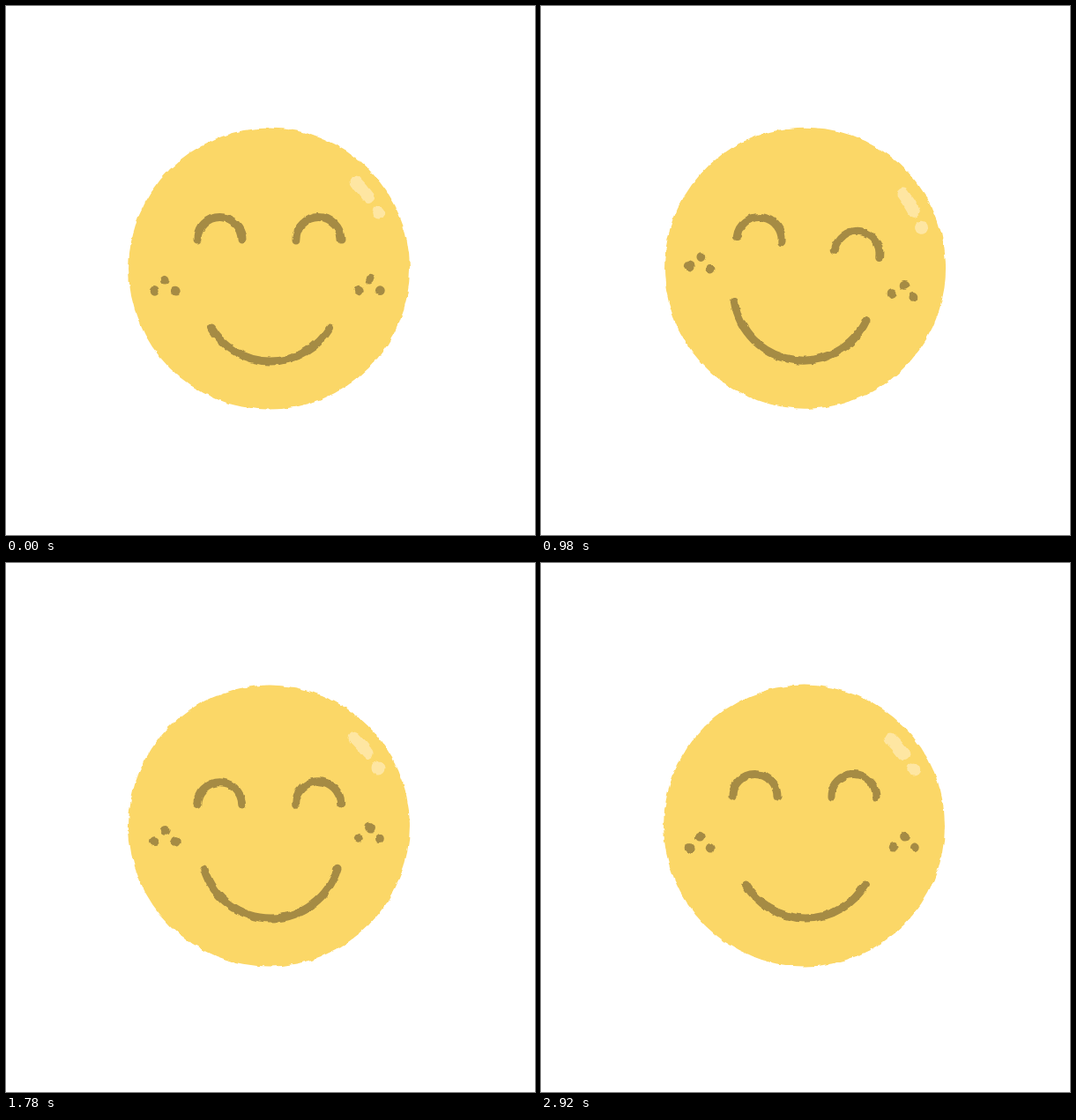
Animation of 600x600 px, one loop 2960 ms. Source, as an HTML page:

```html
<!DOCTYPE html>
<html lang="en">
<head>
<meta charset="utf-8">
<title>Smiley</title>
<style>
  html, body { margin: 0; width: 100%; height: 100%; overflow: hidden; background: #fff; }
  svg { display: block; width: 100%; height: 100%; }
  .line { fill: none; stroke: #a58b44; stroke-width: 9; stroke-linecap: round; }
  .dot { fill: #a58b44; }
</style>
</head>
<body>
<svg viewBox="0 0 600 600">
  <defs>
    <filter id="rough" filterUnits="userSpaceOnUse" x="125" y="125" width="350" height="350" color-interpolation-filters="sRGB">
      <feTurbulence id="noise" type="fractalNoise" baseFrequency="0.09" numOctaves="2" seed="1" result="n"/>
      <feDisplacementMap in="SourceGraphic" in2="n" scale="4.5" xChannelSelector="R" yChannelSelector="G"/>
      <feGaussianBlur stdDeviation="0.4"/>
    </filter>
  </defs>
  <g filter="url(#rough)">
    <g id="head">
      <circle cx="298.5" cy="298" r="159.5" fill="#fbd767"/>
      <path d="M396.5 199.5A139 139 0 0 1 411.5 217" fill="none" stroke="#fee6a2" stroke-width="14" stroke-linecap="round"/>
      <circle cx="422.7" cy="234" r="7.5" fill="#fee6a2"/>
      <g id="eyes" class="line">
        <path d="M217 265a25.5 25.5 0 0 1 51 0"/>
        <path d="M329 265a25.5 25.5 0 0 1 51 0"/>
      </g>
      <g id="freckles" class="dot">
        <circle cx="180.2" cy="311.2" r="5.4"/>
        <circle cx="168.2" cy="323.4" r="5.4"/>
        <circle cx="192.2" cy="323.2" r="5.4"/>
        <circle cx="412.6" cy="310.2" r="5.4"/>
        <circle cx="400.2" cy="322.2" r="5.4"/>
        <circle cx="424.3" cy="322.7" r="5.4"/>
      </g>
      <path id="mouth" class="line"/>
    </g>
  </g>
</svg>
<script>
  const LOOP = 2960;
  const BOIL = 1000 / 30;
  // [time in ms, value]
  const JOY = [[20, 0], [533, 1], [1860, 1], [2390, 0]];
  const TILT = [[533, 0], [867, 10], [1467, -10], [1833, 0]];
  const [noise, head, eyes, freckles, mouth] =
    ['noise', 'head', 'eyes', 'freckles', 'mouth'].map(id => document.getElementById(id));

  const ease = u => u * u * (3 - 2 * u);

  function valueAt(keys, t) {
    if (t <= keys[0][0]) return keys[0][1];
    for (let i = 1; i < keys.length; i++) {
      const [t0, a] = keys[i - 1], [t1, b] = keys[i];
      if (t < t1) return a + (b - a) * ease((t - t0) / (t1 - t0));
    }
    return keys[keys.length - 1][1];
  }

  function smilePath(joy) {
    const r = 79, angle = (31.3 - 14.4 * joy) * Math.PI / 180;
    const x = r * Math.cos(angle), y = 324 + r * Math.sin(angle);
    return `M${300 - x} ${y}A${r} ${r} 0 0 0 ${300 + x} ${y}`;
  }

  function draw(t) {
    const joy = valueAt(JOY, t);
    head.setAttribute('transform', `rotate(${valueAt(TILT, t)} 305 305)`);
    eyes.setAttribute('transform', `translate(0 ${8.6 * joy})`);
    freckles.setAttribute('transform', `translate(0 ${-9 * joy})`);
    mouth.setAttribute('d', smilePath(joy));
    const seed = String(1 + Math.floor(t / BOIL));
    if (noise.getAttribute('seed') !== seed) noise.setAttribute('seed', seed);
  }

  const start = performance.now();
  function tick() {
    draw((performance.now() - start) % LOOP);
    requestAnimationFrame(tick);
  }
  tick();
</script>
</body>
</html>
```
